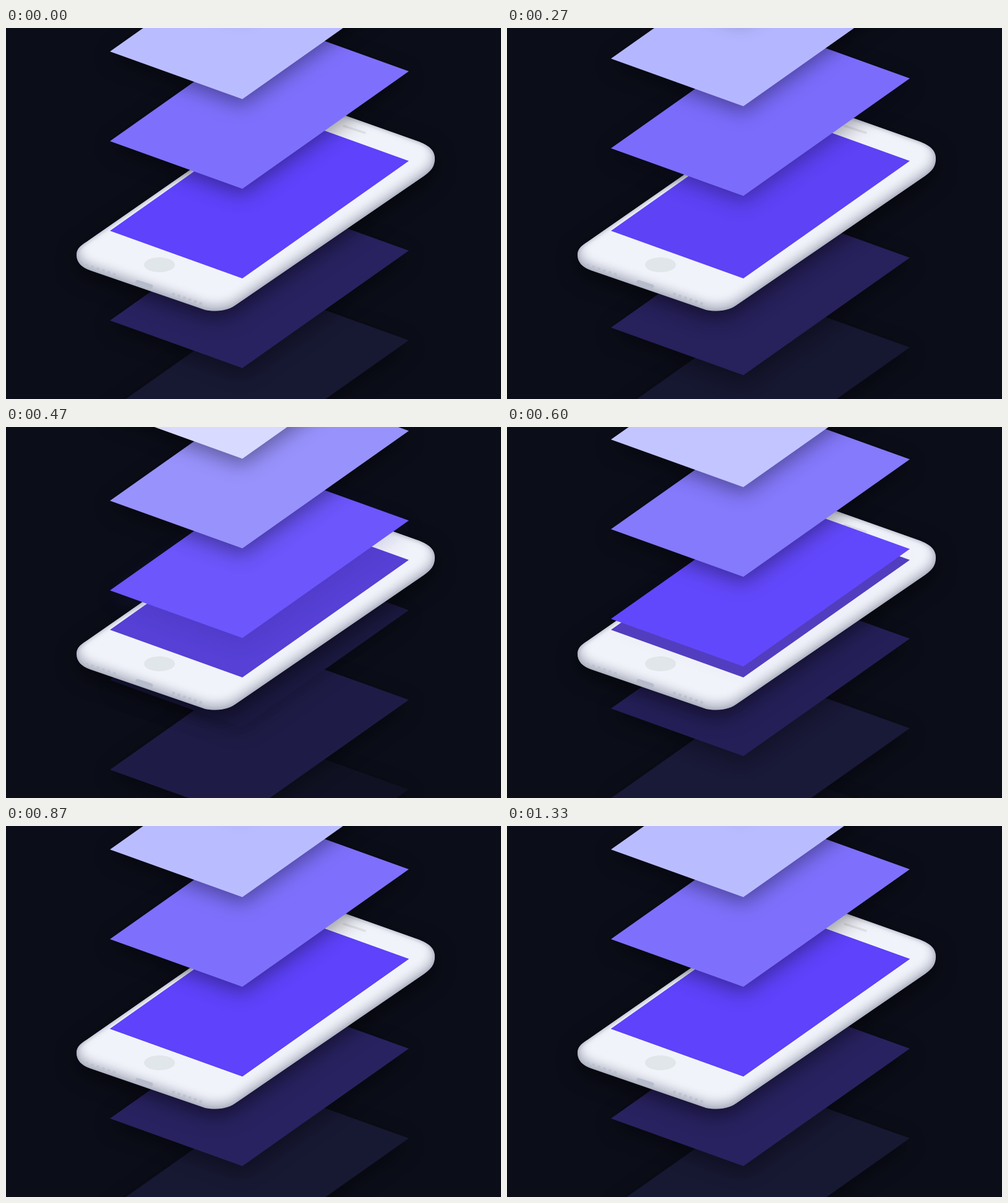
These frames come from a looping animation (800x600 px, 1740 ms). An HTML page with a canvas:

```html
<!DOCTYPE html>
<html lang="en">
<head>
<meta charset="utf-8">
<title>Phone layers</title>
<style>
  html, body { margin: 0; height: 100%; overflow: hidden; background: #0b0d18; }
  canvas { display: block; }
</style>
</head>
<body>
<canvas id="stage" width="800" height="600"></canvas>
<script>
const ctx = document.getElementById('stage').getContext('2d');

const LOOP = 1740, STEP = 1000 / 15, START = 50, MOVE = 800;
const GAP = 145, SCREEN_Y = 328;
const BG = [11, 13, 24], WHITE = [255, 255, 255], BLACK = [0, 0, 0];
const SHADE = 0.38;

// Sheet colours from the top slot down; slot 0 is the phone screen.
const ABOVE = { '-4': WHITE, '-3': WHITE, '-2': [185, 189, 255], '-1': [126, 112, 252], 0: [94, 66, 252] };
const BELOW = [BG, [40, 34, 96], [23, 24, 50], BG];
const SCREEN_DIM = [80, 62, 182];

const body = new Path2D(
  'M114 367C114 358 119 353 130 346L445 127Q466 112 490 121L665 183' +
  'C684 190 693 198 693 211C693 224 687 231 676 239L374 446' +
  'C361 456 345 460 322 456L136 392C122 387 114 379 114 367Z');

const mix = (a, b, p) => a.map((v, i) => v + (b[i] - v) * p);
const css = (c, alpha = 1) => `rgba(${c.map(Math.round)},${alpha})`;
const ease = u => u < 0.5 ? 4 * u ** 3 : 1 - 4 * (1 - u) ** 3;

function setShadow(color, blur = 32, dy = 10) {
  ctx.shadowColor = color;
  ctx.shadowBlur = blur;
  ctx.shadowOffsetY = dy;
}

function sheet(y, color, shadow = 'transparent') {
  ctx.save();
  setShadow(shadow);
  ctx.fillStyle = css(color);
  ctx.beginPath();
  ctx.moveTo(168, y);
  ctx.lineTo(382, y + 77);
  ctx.lineTo(651, y - 113);
  ctx.lineTo(437, y - 190);
  ctx.fill();
  ctx.restore();
}

function line(x1, y1, x2, y2, width, color) {
  ctx.lineWidth = width;
  ctx.strokeStyle = color;
  ctx.beginPath();
  ctx.moveTo(x1, y1);
  ctx.lineTo(x2, y2);
  ctx.stroke();
}

function ellipse(x, y, rx, ry, color) {
  ctx.fillStyle = color;
  ctx.beginPath();
  ctx.ellipse(x, y, rx, ry, 0, 0, 7);
  ctx.fill();
}

function phone() {
  ctx.save();
  setShadow(css(BLACK, 0.5));
  ctx.fillStyle = '#b6bac8';
  ctx.fill(body);
  setShadow('transparent');
  ctx.clip(body);

  // Soft top face over the darker sides.
  ctx.save();
  ctx.filter = 'blur(8px)';
  ctx.translate(403.5, 278);
  ctx.scale(0.985, 0.985);
  ctx.translate(-403.5, -286);
  ctx.fillStyle = '#f1f3fa';
  ctx.fill(body);
  ctx.restore();

  ctx.save();
  ctx.filter = 'blur(2px)';
  ctx.lineWidth = 4;
  ctx.strokeStyle = 'rgba(150,156,175,.45)';
  ctx.stroke(body);
  ctx.restore();

  ctx.lineCap = 'round';
  ellipse(248, 383, 25, 12, '#e0e6e9');
  line(546, 158.5, 580, 169.5, 3.5, '#dfe1e7');
  line(212.5, 411, 234, 418, 7, '#b7bdcc');
  for (let i = 0; i < 6; i++) {
    ellipse(130.5 + 8.9 * i, 384 + 3 * i, 2.7, 2.7, '#bdc2d0');
    ellipse(270.5 + 8.8 * i, 431 + 3 * i, 2.7, 2.7, '#bdc2d0');
  }
  ctx.restore();
}

function draw(time) {
  const tick = Math.floor((Math.floor(time / 10) * 10 + 3.4) / STEP);
  const p = ease(Math.min(1, Math.max(0, (tick * STEP - START) / MOVE)));
  const slotY = k => SCREEN_Y + GAP * (k + p);

  ctx.fillStyle = css(BG);
  ctx.fillRect(0, 0, 800, 600);

  for (let k = 2; k >= 0; k--) {
    sheet(slotY(k), mix(BELOW[k], BELOW[k + 1], p), css(BLACK, k ? SHADE : SHADE * p));
  }

  phone();
  sheet(SCREEN_Y, mix(ABOVE[0], SCREEN_DIM, p));

  for (let k = -1; k >= -4; k--) {
    const landing = k === -1;
    const shadow = landing ? css(mix(BLACK, ABOVE[0], p), SHADE * (1 - p)) : css(BLACK, SHADE);
    sheet(slotY(k), mix(ABOVE[k], ABOVE[k + 1], p), shadow);
  }
}

function play() {
  draw(performance.now() % LOOP);
  requestAnimationFrame(play);
}
play();
</script>
</body>
</html>
```
